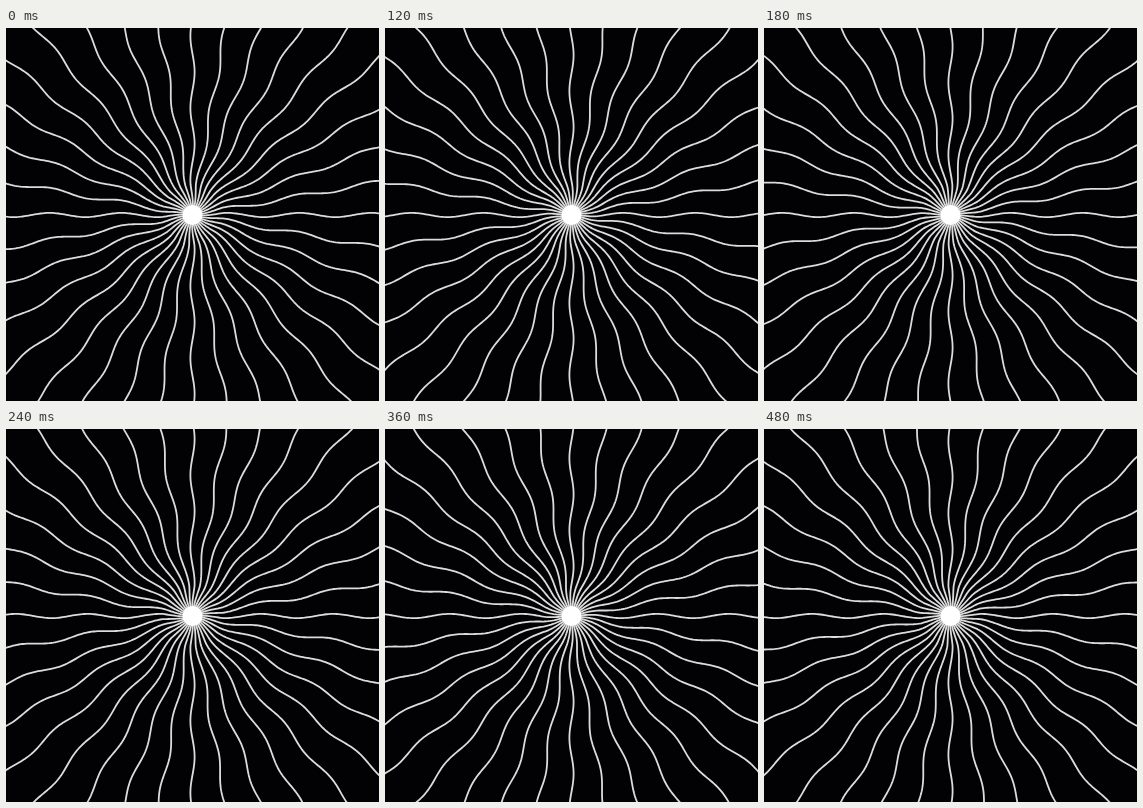
Recreate the animation shown at these times as an HTML page with a canvas. Size 373x373 px, loop 510 ms.

```html
<!DOCTYPE html>
<html lang="en">
<head>
<meta charset="utf-8">
<title>Wavy rays</title>
<style>
  html, body { margin: 0; width: 100%; height: 100%; overflow: hidden; background: #020103; }
  canvas { display: block; }
</style>
</head>
<body>
<canvas id="stage" width="373" height="373"></canvas>
<script>
const ctx = document.getElementById('stage').getContext('2d');
const SIZE = 373, CENTER_X = 186.5, CENTER_Y = 187;
const STEP = 30, STEPS = 17;
const RAYS = 36, REACH = 270;
const AMPLITUDE = 2.1, WAVELENGTH = 72, CREST = 179;

// Sideways offset of a ray at distance r; crests travel outwards once per loop.
function sway(r, phase) {
  const ease = Math.min(1, r / 30);
  return AMPLITUDE * ease * Math.cos(2 * Math.PI * ((r - CREST) / WAVELENGTH - phase));
}

function draw(phase) {
  ctx.setTransform(1, 0, 0, 1, 0, 0);
  ctx.fillStyle = '#020103';
  ctx.fillRect(0, 0, SIZE, SIZE);

  const ray = new Path2D();
  for (let r = 0; r <= REACH; r += 2) ray.lineTo(r, -sway(r, phase));

  ctx.translate(CENTER_X, CENTER_Y);
  ctx.strokeStyle = '#dcdcdc';
  ctx.lineWidth = 1.8;
  ctx.lineJoin = 'round';
  for (let i = 0; i < RAYS; i++) {
    ctx.stroke(ray);
    ctx.rotate(2 * Math.PI / RAYS);
  }

  ctx.fillStyle = '#fff';
  ctx.beginPath();
  ctx.arc(0, 0, 10, 0, 2 * Math.PI);
  ctx.fill();
}

function tick() {
  draw(Math.floor(performance.now() / STEP) % STEPS / STEPS);
  requestAnimationFrame(tick);
}
tick();
</script>
</body>
</html>
```
